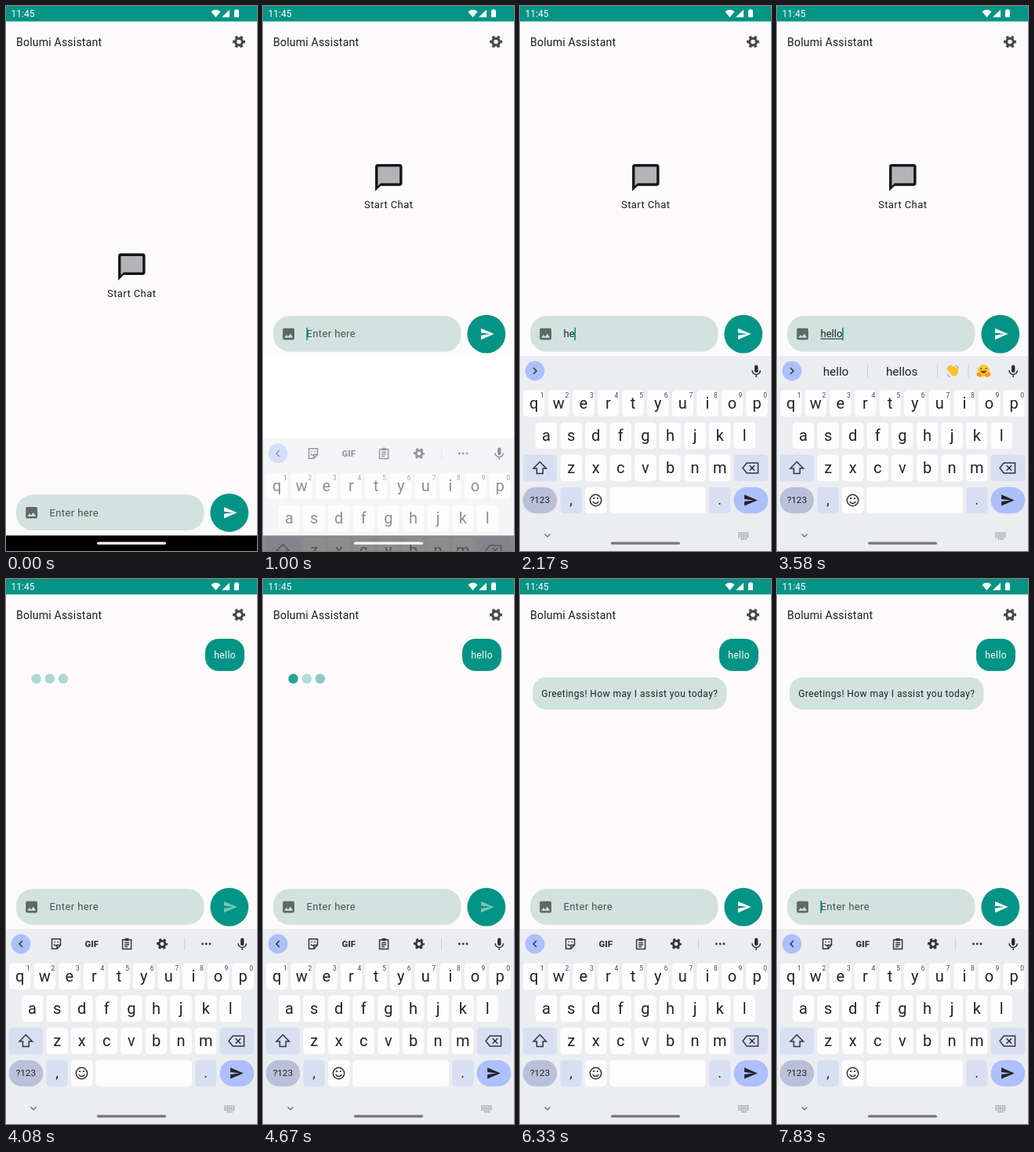
Write an HTML page that moves like this. It is 320 by 693 pixels and loops after 8 s.

```html
<!DOCTYPE html>
<html lang="en">
<head>
<meta charset="utf-8">
<title>Chat</title>
<style>
html, body { margin: 0; width: 100%; height: 100%; overflow: hidden; background: #fcfafb; }
svg { display: block; width: 100vw; height: 100vh; font-family: Roboto, sans-serif; }
.teal { fill: #039485; }
.mint { fill: #d3e2de; }
.line { fill: none; stroke: #30363a; stroke-width: 1.5; }
.label { font-size: 13px; letter-spacing: .4px; }
.msg { font-size: 12px; letter-spacing: .43px; }
.mid { text-anchor: middle; }
.ink { fill: #202326; }
</style>
</head>
<body>
<svg viewBox="0 0 320 693" preserveAspectRatio="none">
  <defs>
    <g id="gear" fill="none">
      <circle r="4.4" stroke-width="3.2"/>
      <circle r="6.6" stroke-width="2.8" pathLength="12" stroke-dasharray="1" stroke-dashoffset=".5"/>
    </g>
    <path id="plane" d="M2 21 23 12 2 3V10L17 12 2 14z"/>
  </defs>

  <rect width="320" height="693" fill="#fcfafb"/>
  <rect class="teal" width="320" height="19.6"/>
  <g fill="#fff">
    <text x="6.5" y="14.3" font-size="12">11:45</text>
    <path d="M261.5 7.2Q267.5 2.4 273.5 7.2L267.5 14.5zM285 4.7V14.3H275zM292.5 5.2V4.2H295.5V5.2H297V14.3H291V5.2z"/>
  </g>
  <text x="13" y="50.5" font-size="14" letter-spacing=".22" fill="#1c1b1f">Bolumi Assistant</text>
  <use href="#gear" x="297" y="45.5" stroke="#49474d"/>

  <g id="start">
    <g transform="translate(139.6 311) scale(1.725)">
      <path d="M4 4h16v12H6l-2 2z" fill="#b5b3b7"/>
      <path d="M20 2H4Q2 2 2 4V22L6 18H20Q22 18 22 16V4Q22 2 20 2zM20 16H6L4 18V4H20z" fill="#14151a" fill-rule="evenodd"/>
    </g>
    <text class="label mid" x="160.2" y="370.3" fill="#1c1b1f">Start Chat</text>
  </g>

  <g id="sent">
    <rect class="teal" x="254" y="76" width="50" height="41" rx="17"/>
    <text class="msg mid" x="279.2" y="100.6" fill="#fff">hello</text>
  </g>
  <g id="dots" class="teal">
    <circle cx="38.6" cy="126.8" r="6.2"/>
    <circle cx="55.8" cy="126.8" r="6.2"/>
    <circle cx="72.9" cy="126.8" r="6.2"/>
  </g>
  <g id="reply">
    <rect class="mint" x="16" y="125" width="247.5" height="41" rx="17"/>
    <text class="msg" x="27.3" y="149.8" fill="#1b2523">Greetings! How may I assist you today?</text>
  </g>

  <g id="under" fill="#fff"><rect y="445" width="320" height="248"/></g>

  <g id="input">
    <rect class="mint" x="13" y="621.3" width="239.5" height="45.6" rx="21"/>
    <rect x="25.2" y="637" width="14.8" height="14.6" rx="1.8" fill="#5f6866"/>
    <path class="mint" d="M27.2 649 30 645.3 32 647.7 34.8 644 38.2 649z"/>
    <text id="hint" class="label" x="55.5" y="648.6" fill="#47514f">Enter here</text>
    <text id="typed" x="55.5" y="648.6" font-size="13" fill="#17201e"></text>
    <rect id="rule" x="55.5" y="649.9" width="28" height="1" fill="#17201e"/>
    <rect id="caret" class="teal" y="636.2" width="1.7" height="16"/>
    <circle class="teal" cx="284.8" cy="644.3" r="24.4"/>
    <use id="send" href="#plane" fill="#fff" transform="translate(276.4 634.8) scale(.79)"/>
  </g>

  <g id="board">
    <rect y="445" width="320" height="248" fill="#ecedf0"/>
    <circle cx="19" cy="464" r="12.4" fill="#adc0fc"/>
    <path id="chevron" class="line" stroke-width="1.8" d="M2 -4 -2 0 2 4"/>
    <g fill="#2a2e31">
      <rect x="299" y="456.5" width="4.4" height="9.6" rx="2.2"/>
      <path class="line" d="M296 463.3a5.2 5.2 0 0 0 10.4 0M301.2 468.6V472"/>
    </g>
    <g id="tools">
      <path class="line" d="M58.5 457.8H69.5V465.5L65 470.2H58.5zM65 470V465.6H69.5M61 464.3Q62.5 467 64.8 465.6M61.3 461.4h1.6M65.2 461.4h1.6"/>
      <text class="mid" x="109.2" y="468" font-size="11.3" font-weight="900" fill="#30363a">GIF</text>
      <path class="line" d="M148.6 458.7H159.6V470.6H148.6zM151.2 462.5h5.8M151.2 465h5.8M151.2 467.5h4"/>
      <rect x="151.6" y="456.8" width="5" height="3.4" fill="#30363a"/>
      <use href="#gear" stroke="#30363a" transform="translate(199 464) scale(.88)"/>
      <path d="M227.5 456V472" stroke="#cfd1d5"/>
      <path d="M250.4 464h.01M255.2 464h.01M260 464h.01" stroke="#30363a" stroke-width="2.8" stroke-linecap="round"/>
    </g>
    <g id="hints">
      <g class="mid ink" font-size="15.3">
        <text x="75" y="470">hello</text>
        <text x="159.2" y="470">hellos</text>
      </g>
      <path d="M115.5 455.5V472.5M204.5 455.5V472.5M244 455.5V472.5" stroke="#cbcdd1"/>
      <g stroke="#fbc02d" stroke-width="2.9" stroke-linecap="round">
        <path d="M221 465 217.8 461.4M222.6 463.2 219 458.9M224.8 462 221.6 457.8M227.2 462.2 224.8 459.2M229 466 229.6 460.5"/>
        <ellipse cx="225.4" cy="465.8" rx="3.2" ry="3.8" transform="rotate(-40 225.4 465.8)" fill="#fbc02d"/>
        <path d="M227.8 457.2q2.6 .4 3.2 2.8M217 468q.8 2.8 3.4 3.6" fill="none" stroke="#5b9bd5" stroke-width="1"/>
      </g>
      <circle cx="263.4" cy="463.6" r="7.6" fill="#fcc934"/>
      <path d="M259 461.5q1.3-2 2.6 0M265.2 461.5q1.3-2 2.6 0M259.6 464.3q3.8 4.6 7.6 0z" fill="#6b3d12" stroke="#6b3d12" stroke-width=".8"/>
      <g fill="#f59a23"><ellipse cx="258" cy="469" rx="3.7" ry="2.6" transform="rotate(25 258 469)"/><ellipse cx="268.8" cy="469" rx="3.7" ry="2.6" transform="rotate(-25 268.8 469)"/></g>
    </g>
    <g id="keys"></g>
    <g class="line">
      <path d="M25.3 579.5 33.5 588H29.2V594.5H21.4V588H17.1z"/>
      <path d="M284 587.5 289.2 581H303.5V594H289.2zM292.6 584.2 299.2 590.8M299.2 584.2 292.6 590.8"/>
      <circle cx="96.5" cy="628.5" r="7.2"/>
      <path d="M92.6 630.2q3.9 4.6 7.8 0"/>
      <path stroke="#606468" stroke-width="1.2" d="M31.5 671.5 35 675 38.5 671.5"/>
      <path stroke="#606468" stroke-width="1.3" stroke-dasharray="1.4 1.2" d="M278.5 670.2H292M278.5 672.7H292M278.5 675.2H292M282 677.7H289"/>
    </g>
    <path class="ink" d="M93.2 626h1.9M97.9 626h1.9" stroke="#30363a" stroke-width="1.9"/>
    <use href="#plane" class="ink" transform="translate(284.5 619) scale(.79)"/>
  </g>

  <rect id="nav" y="673.3" width="320" height="19.7"/>
  <rect id="pill" x="116" y="681.6" width="88" height="3.2" rx="1.6"/>
</svg>
<script>
const $ = id => document.getElementById(id);
const clamp = x => Math.max(0, Math.min(1, x));
const ramp = (t, from, to) => clamp((t - from) / (to - from));
const show = (id, on) => $(id).style.display = on ? '' : 'none';
const shift = (id, x, y) => $(id).setAttribute('transform', `translate(${x} ${y})`);

// Keyboard
const WHITE = '#fdfdfe', BLUE = '#d8dff3';
let keys = '';
function key(x, row, w, fill, label = '', size = 20, r = 4.5) {
  const y = 488.4 + row * 41.1;
  keys += `<rect x="${x}" y="${y}" width="${w}" height="33.6" rx="${r}" fill="${fill}"/>
    <text class="mid ink" x="${x + w / 2}" y="${y + 16.8 + size * .32}" font-size="${size}">${label}</text>`;
}
[['qwertyuiop', 4], ['asdfghjkl', 19.8], ['zxcvbnm', 51.4]].forEach(([letters, left], row) =>
  [...letters].forEach((c, i) => {
    const x = left + i * 31.6;
    key(x, row, 27.4, WHITE, c);
    if (!row) keys += `<text class="mid" x="${x + 24.2}" y="498" font-size="8.5" fill="#45494d">${(i + 1) % 10}</text>`;
  }));
key(3.6, 2, 43.6, BLUE);
key(272.5, 2, 43.8, BLUE);
key(3.6, 3, 43.6, '#b9c1da', '?123', 11.8, 16.8);
key(51.4, 3, 27.4, BLUE, ',', 18);
key(83, 3, 27.4, WHITE);
key(114.2, 3, 122.8, WHITE);
key(241, 3, 27.4, BLUE, '.', 18);
key(272.5, 3, 43.8, '#adc0fc', '', 20, 16.8);
$('keys').innerHTML = keys;

// Timeline in ms
const LOOP = 8000, FOCUS = 830, RESIZE = 915, SLIDE = 930, SENT = 3670, REPLY = 5670, REFOCUS = 5830;
const STROKES = [2000, 2170, 2330, 2500, 2580];
const DOT_START = 4070, DOT_TIMES = [500, 300, 340];

function triangle(x) {
  const p = Math.abs(x) % 2;
  return p < 1 ? p : 2 - p;
}

function draw(t) {
  const open = t >= RESIZE, sent = t >= SENT, replied = t >= REPLY;
  const typed = sent ? '' : 'hello'.slice(0, STROKES.filter(s => t >= s).length);

  shift('start', 0, open ? -113.4 : 0);
  shift('input', 0, open ? -227.2 : 0);
  show('start', !sent);
  show('sent', sent);
  show('dots', sent && !replied);
  show('reply', replied);
  show('under', open);
  [...$('dots').children].forEach((dot, i) =>
    dot.setAttribute('opacity', .3 + .7 * triangle((t - DOT_START) / DOT_TIMES[i])));

  $('typed').textContent = typed;
  show('hint', !typed);
  show('rule', typed && t >= 2750);
  $('send').setAttribute('opacity', sent && !replied ? .45 : 1);

  const blinkFrom = [FOCUS, ...STROKES, REFOCUS].filter(s => t >= s).pop();
  const focused = t >= FOCUS && (!sent || t >= REFOCUS);
  show('caret', focused && (t - blinkFrom) % 1000 < 500);
  $('caret').setAttribute('x', 55.3 + (typed ? $('typed').getComputedTextLength() : 0));

  const slide = 1 - (1 - ramp(t, SLIDE, SLIDE + 285)) ** 3;
  shift('board', 0, 248 * (1 - slide));
  $('board').setAttribute('opacity', ramp(t, SLIDE, SLIDE + 140));
  const suggesting = t >= 2000 && t < 3750;
  show('tools', !suggesting);
  show('hints', suggesting && t >= 2750);
  $('chevron').setAttribute('transform', `translate(19 464) scale(${suggesting ? -1 : 1} 1)`);

  $('nav').setAttribute('opacity', 1 - ramp(t, RESIZE, RESIZE + 155));
  const grey = 255 - 136 * ramp(t, 1170, 1830);
  $('pill').setAttribute('fill', `rgb(${grey},${grey},${grey})`);
}

const begin = performance.now();
function tick() {
  draw((performance.now() - begin) % LOOP);
  requestAnimationFrame(tick);
}
tick();
</script>
</body>
</html>
```
